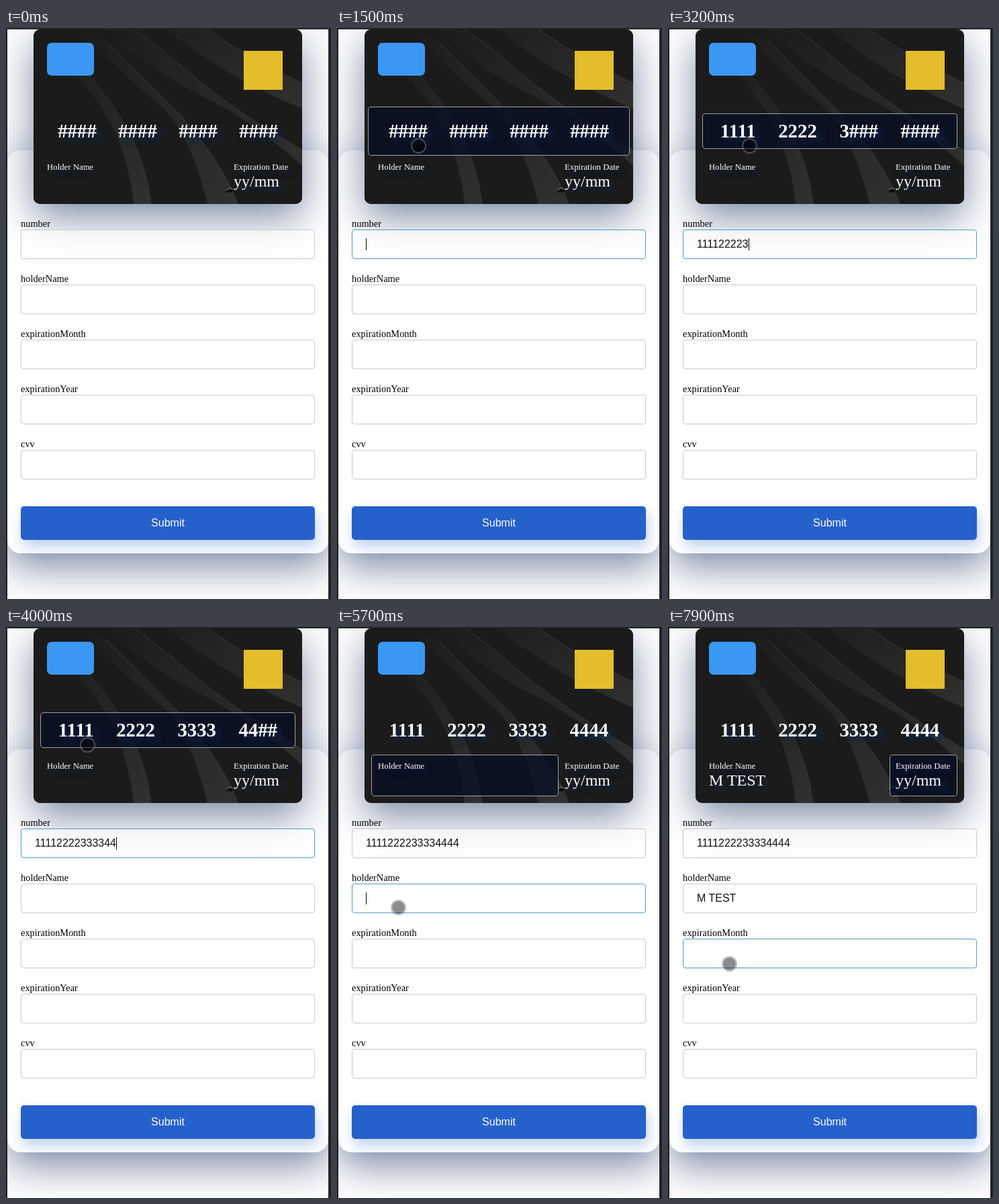
An HTML page that plays this animation: 484x850 px, repeating every 8000 ms.

```html
<!DOCTYPE html>
<html lang="en">
<head>
<meta charset="utf-8">
<title>Card form</title>
<style>
html, body { margin: 0; width: 100%; height: 100%; overflow: hidden; background: #232227; }
#page { position: absolute; width: 484px; height: 850px; overflow: hidden; background: #fff;
  clip-path: inset(2px 4px 0 2px); font-family: "Liberation Serif", "Times New Roman", serif; }
#page div, #page svg { position: absolute; box-sizing: border-box; white-space: pre; }
#panel { left: 2px; top: 182px; width: 478px; height: 600px; border-radius: 20px; background: #fff;
  box-shadow: 0 20px 60px rgba(14,42,90,.55); }
#card { left: 41px; top: 2px; width: 400px; height: 260px; border-radius: 10px; background: #1b1b1b;
  box-shadow: 0 20px 60px rgba(14,42,90,.55); }
#art { left: 41px; top: 2px; border-radius: 10px; }
#focus { border: 1px solid rgba(255,255,255,.6); border-radius: 5px; background: rgba(8,15,38,.72); }
#digits { left: 61px; top: 137px; width: 360px; display: flex; justify-content: space-around;
  font: bold 28.8px/33px "Liberation Serif", "Times New Roman", serif; }
#digits, .info { color: #fff; text-shadow: 7px 6px 10px rgba(14,42,90,.8); }
.info { top: 200px; font-size: 12.8px; line-height: 15px; }
.info p { margin: 0; font-size: 24px; line-height: 27px; }
.label { left: 22px; font-size: 14.4px; line-height: 17px; color: #000; }
.field { left: 22px; width: 438px; height: 44px; border: 1px solid #c9c9c9; border-radius: 4px;
  padding-left: 20px; background: rgba(255,255,255,.6); color: #111;
  font: 16px/42px "Liberation Sans", Arial, sans-serif; }
.field.on { border-color: #4d9acb; }
.field i { display: inline-block; width: 1px; height: 18px; margin-right: -1px; vertical-align: -4px; background: #000; }
#submit { left: 22px; top: 712px; width: 438px; height: 50px; border-radius: 5px; background: #2660cb;
  box-shadow: 3px 10px 20px rgba(35,100,210,.3); color: #fff; text-align: center;
  font: 16px/50px "Liberation Sans", Arial, sans-serif; }
#pointer { width: 23px; height: 23px; margin: -11px; border-radius: 50%; border: 2px solid rgba(128,128,128,.5);
  background: rgba(0,0,0,.45) padding-box; }
</style>
</head>
<body>
<div id="page">
  <div id="panel"></div>
  <div id="card"></div>
  <svg id="art" width="400" height="260" viewBox="41 2 400 260">
    <defs>
      <linearGradient id="band" x1="0" y1="0" x2="1" y2="1">
        <stop offset="0" stop-color="#1c1c1c"/><stop offset=".65" stop-color="#292929"/><stop offset="1" stop-color="#303030"/>
      </linearGradient>
    </defs>
    <rect x="41" y="2" width="400" height="260" fill="#1b1b1b"/>
    <g fill="url(#band)">
      <path d="M170 2H300Q360 45 441 82V120Q330 75 240 2Z"/>
      <path d="M150 2Q210 60 290 100T441 205V182Q350 130 270 65Q225 25 190 2Z"/>
      <path d="M110 2Q180 75 235 120Q275 160 300 262H345Q325 205 260 130Q200 70 150 20Z"/>
      <path d="M85 50Q140 105 165 160Q185 210 190 262H216Q210 200 175 140Q140 85 100 45Z"/>
    </g>
    <g fill="none" stroke="#474747" stroke-width="1" opacity=".7">
      <path d="M190 2Q225 25 270 65Q350 130 441 182"/>
      <path d="M150 20Q200 70 260 130Q325 205 345 262"/>
      <path d="M300 2Q360 45 441 82"/>
      <path d="M100 45Q140 85 175 140Q210 200 216 262" opacity=".6"/>
    </g>
    <path d="M327 246l3-5 4-2 4 3-2 3-5-1Z" fill="#090909"/>
    <path d="M329 241l5-3 4 2" fill="none" stroke="#888"/>
    <rect x="61" y="22" width="70" height="49" rx="7" fill="#3a98f4"/>
    <rect x="354" y="34" width="58" height="58" fill="#e3bd2c"/>
  </svg>
  <div id="focus"></div>
  <div id="digits"><span></span><span></span><span></span><span></span></div>
  <div class="info" style="left:61px">Holder Name<p id="holder"></p></div>
  <div class="info" style="left:339px">Expiration Date<p>yy/mm</p></div>
  <div id="submit">Submit</div>
  <div id="pointer"></div>
</div>
<script>
const $ = id => document.getElementById(id);
const LOOP = 8000, NUMBER = '1111222233334444', NAME = 'M TEST';

const add = (cls, top, text = '') => {
  const el = document.createElement('div');
  el.className = cls;
  el.style.top = top + 'px';
  el.textContent = text;
  $('page').insertBefore(el, $('submit'));
  return el;
};
const fields = ['number', 'holderName', 'expirationMonth', 'expirationYear', 'cvv'].map((name, i) => {
  add('label', 283 + 82 * i, name);
  return add('field', 300 + 82 * i);
});

// Focus changes and key presses: [time, field, value]
const events = [[1170, 0, '']];
for (let n = 1; n <= 16; n++) events.push([n < 16 ? 1800 + 150 * n : 4550, 0, NUMBER.slice(0, n)]);
events.push([5280, 1, '']);
[6000, 6650, 6750, 6850, 6950, 7050].forEach((t, i) => events.push([t, 1, NAME.slice(0, i + 1)]));
events.push([7350, 2, '']);

// Highlight moves: [start, duration, x, y, width, height, opacity]
const moves = [
  [0, 1, 41, 2, 400, 260, 0],
  [1170, 330, 46, 117, 390, 73, 1],
  [1500, 80, 51, 127, 380, 53, 1],
  [5280, 350, 51, 190, 279, 62, 1],
  [7350, 350, 330, 190, 101, 62, 1]
];
// Pointer moves: [start, duration, x, y]
const path = [
  [0, 1, 10, -20],
  [400, 600, 121, 175],
  [4200, 300, 92, 440],
  [4550, 350, 91, 417],
  [7050, 250, 91, 501]
];

function follow(steps, t) {
  let now = steps[0].slice(2);
  for (const [start, length, ...goal] of steps) {
    const p = Math.min(1, Math.max(0, (t - start) / length)), e = p * p * (3 - 2 * p);
    now = now.map((v, i) => v + (goal[i] - v) * e);
  }
  return now;
}

function draw() {
  const t = performance.now() % LOOP;
  const values = ['', '', '', '', ''];
  let active = -1, last = 0;
  for (const [time, field, value] of events) {
    if (time > t) break;
    values[field] = value;
    active = field;
    last = time;
  }
  fields.forEach((el, i) => {
    const on = i === active;
    el.classList.toggle('on', on);
    el.textContent = values[i];
    if (on && (t - last) % 1000 < 500) el.append(document.createElement('i'));
  });

  const digits = values[0].padEnd(16, '#');
  [...$('digits').children].forEach((el, i) => el.textContent = digits.slice(4 * i, 4 * i + 4));
  $('holder').textContent = values[1];

  const [x, y, w, h, opacity] = follow(moves, t);
  Object.assign($('focus').style, { left: x + 'px', top: y + 'px', width: w + 'px', height: h + 'px', opacity });
  const [px, py] = follow(path, t);
  Object.assign($('pointer').style, { left: px + 'px', top: py + 'px' });
  requestAnimationFrame(draw);
}
draw();
</script>
</body>
</html>
```
